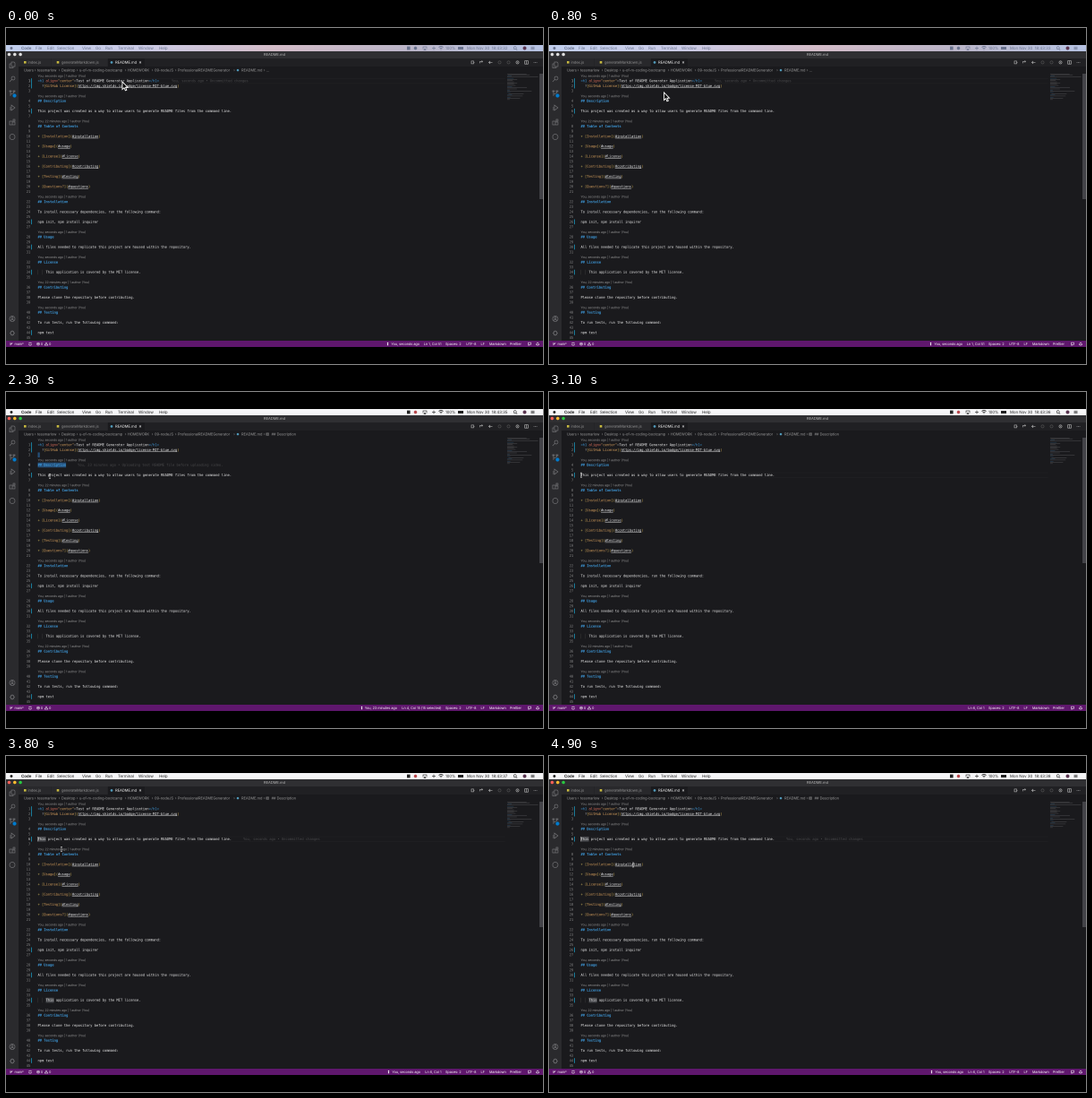
Write an HTML page with a canvas that moves like this. It is 600 px wide and 375 px high and loops after 5 s.

```html
<!DOCTYPE html>
<html lang="en">
<head>
<meta charset="utf-8">
<title>README editor</title>
<style>
  html, body { margin: 0; width: 100%; height: 100%; overflow: hidden; background: #000; }
  canvas { display: block; width: 600px; height: 375px; }
</style>
</head>
<body>
<canvas id="stage" width="600" height="375"></canvas>
<script>
const LOOP = 5000, STEP = 100, SCALE = 4;
const LEFT = 35.5, TOP = 59, CHAR = 2.257, ROW = 5.62;
const SANS = 'Inter, "Liberation Sans", sans-serif';
const MONO = '"DejaVu Sans Mono", monospace';
const WHITE = '#f0f0f0', GREY = '#a0a0a0', DIM = '#4a4a4c', BLUE = '#3f9bdc', ORANGE = '#dba35f', GOLD = '#d8b455';

// The scene is drawn large and scaled down, like a shrunken screen recording.
const stage = document.getElementById('stage').getContext('2d');
const scene = document.createElement('canvas');
scene.width = 600 * SCALE;
scene.height = 375 * SCALE;
const ctx = scene.getContext('2d');
ctx.scale(SCALE, SCALE);
stage.imageSmoothingQuality = 'high';

const LINES = `<h1 align="center">Test of README Generator Application</h1>
  ![GitHub License](https://img.shields.io/badge/license-MIT-blue.svg)

## Description

This project was created as a way to allow users to generate README files from the command line.

## Table of Contents

+ [Installation](#installation)

+ [Usage](#usage)

+ [License](#license)

+ [Contributing](#contributing)

+ [Testing](#testing)

+ [Questions?](#questions)

## Installation

To install necessary dependencies, run the following command:

npm init, npm install inquirer

## Usage

All files needed to replicate this project are housed within the repository.

## License

    This application is covered by the MIT license.

## Contributing

Please clone the repository before contributing.

## Testing

To run tests, run the following command:

npm test
`.split('\n');
const LENSES = { 1: 'seconds', 4: 'seconds', 8: '22 minutes', 22: 'seconds', 28: 'seconds', 32: 'seconds', 36: '22 minutes', 40: 'seconds' };
const EDITED = [1, 2, 6, 26, 30, 34, 44];

// Each code line sits below the author lenses inserted before it.
const lineY = n => TOP + ROW * (n - 1 + Object.keys(LENSES).filter(k => k > 1 && k <= n).length);

function rect(x, y, w, h, color) {
  ctx.fillStyle = color;
  ctx.fillRect(x, y, w, h);
}

function dot(x, y, r, color) {
  ctx.fillStyle = color;
  ctx.beginPath();
  ctx.arc(x, y, r, 0, 7);
  ctx.fill();
}

function stroke(path, x, y, color = '#7c7c7f', width = 0.6) {
  ctx.save();
  ctx.translate(x, y);
  ctx.strokeStyle = color;
  ctx.lineWidth = width;
  ctx.stroke(new Path2D(path));
  ctx.restore();
}

function text(str, x, y, color, { size = 4.06, font = SANS, weight = 400, align = 'left' } = {}) {
  ctx.save();
  ctx.translate(x, y + size * 0.35);
  ctx.scale(1 / SCALE, 1 / SCALE);
  ctx.font = `${weight} ${size * SCALE}px ${font}`;
  ctx.textAlign = align;
  ctx.fillStyle = color;
  ctx.fillText(str, 0, 0);
  ctx.restore();
}

const mono = (str, x, y, color, options) => text(str, x, y, color, { size: 3.748, font: MONO, ...options });

function pieces(line) {
  if (line.startsWith('##')) return [[line, BLUE, 700]];
  if (line.startsWith('<h1')) {
    return [['<h1', BLUE], [' align=', '#e0705c'], ['"center"', ORANGE], ['>', GREY], [line.slice(19, -5), WHITE], ['</h1>', BLUE]];
  }
  const link = line.match(/^(.*)\[(.*)\]\((.*)\)$/);
  if (!link) return [[line, WHITE]];
  return [[link[1], link[1][0] === '+' ? '#c5b15a' : WHITE], ['[', GOLD], [link[2], ORANGE], ['](', GOLD], [link[3], WHITE, 400, true], [')', GOLD]];
}

function menuTint() {
  const tint = ctx.createLinearGradient(0, 0, 600, 0);
  ['#c1cfee', '#cbcbe6', '#d3bcc8', '#bbb5c8', '#b7c4e4'].forEach((color, i) => tint.addColorStop(i / 4, color));
  return tint;
}

function drawMenu(t, focused) {
  const ink = focused ? '#222' : '#69728e';
  rect(0, 19, 600, 7, focused ? '#f5f5f7' : menuTint());
  dot(6, 22.5, 1.5, ink);
  const menu = [['Code', 17], ['File', 33], ['Edit', 46], ['Selection', 57], ['View', 85], ['Go', 100], ['Run', 111], ['Terminal', 125], ['Window', 148], ['Help', 171]];
  menu.forEach(([name, x], i) => text(name, x, 22.5, ink, { size: 4.4, weight: i ? 400 : 700 }));
  rect(448, 20.6, 3.6, 3.8, ink);
  dot(457.5, 22.5, 1.8, focused ? '#b8474c' : ink);
  stroke('M-2 1V-1.5H2V1M-1 2L0 .6L1 2Z', 468, 22.5, ink);
  stroke('M-2 0H2M0-2V2', 478, 22.5, ink);
  stroke('M-2.5-1Q0-3 2.5-1M-1.4 .4Q0-.8 1.4 .4M0 1V2', 486, 22.5, ink, 0.8);
  text('100%', 491, 22.5, ink, { size: 4.2 });
  rect(505, 21, 6, 3, ink);
  const second = 32 + [500, 1100, 1600, 2600, 3600, 4600].filter(at => t >= at).length;
  text('Mon Nov 30  18:43:' + second, 515, 22.5, ink, { size: 4.35 });
  stroke('M1 1L2.2 2.2M1.2-.3A1.5 1.5 0 1 1-1.8-.3A1.5 1.5 0 1 1 1.2-.3', 569, 22.5, ink);
  dot(579.5, 22.5, 2, '#5a3550');
  stroke('M-2-1.3H2M-2 0H2M-2 1.3H2', 588.5, 22.5, ink);
}

function drawHeader(crumb, focused) {
  rect(0, 26, 600, 8, '#2f2f32');
  const lights = focused ? ['#ff5f57', '#febc2e', '#28c840'] : ['#ddd', '#ddd', '#ddd'];
  lights.forEach((color, i) => dot(3.5 + i * 6.3, 29.5, 1.8, color));
  text('README.md', 300, 29.5, '#b5b5b5', { align: 'center' });

  rect(14, 34, 586, 9, '#202023');
  rect(14, 34, 36.5, 9, '#28282b');
  rect(51, 34, 62.5, 9, '#28282b');
  rect(114, 34, 41, 9, '#1a1a1d');
  [20, 56.7].forEach(x => rect(x, 37, 2.6, 2.6, '#c5b83f'));
  text('index.js', 24.5, 38.3, '#999');
  text('generateMarkdown.js', 62, 38.3, '#999');
  dot(118, 38.4, 1.4, '#519aba');
  text('README.md', 122, 38.3, '#fff');
  stroke('M-1-1L1 1M1-1L-1 1', 150, 38.4, '#ccc');

  const circle = 'M1.6 0A1.6 1.6 0 1 1-1.6 0A1.6 1.6 0 1 1 1.6 0';
  const icons = ['M-1.5-1.5H1V1.5H-1.5ZM1 0H2', 'M-2 1V-1H1M0-2L1-1L0 0', 'M2 0H-2L-.5-1.5M-2 0L-.5 1.5', circle, circle, circle + 'M0-.6V.6', 'M-1.8-1.8H1.8V1.8H-1.8ZM0-1.8V1.8'];
  icons.forEach((path, i) => stroke(path, 521.5 + i * 10, 38.4, i === 3 || i === 4 ? '#555' : '#bbb'));
  [-1.5, 0, 1.5].forEach(dx => dot(591.5 + dx, 38.4, 0.4, '#bbb'));

  const heading = crumb.startsWith('#');
  const crumbs = [['Users', 20], ['tessmarlow', 35], ['Desktop', 62], ['u-of-m-coding-bootcamp', 82], ['HOMEWORK', 136], ['09-nodeJS', 166], ['ProfessionalREADMEGenerator', 192], ['README.md', 263], [crumb, heading ? 296.5 : 291]];
  crumbs.forEach(([name, x], i) => {
    const hasIcon = i === 7 || (i === 8 && heading);
    text(name, x, 47.1, GREY, { size: 3.95 });
    if (i) stroke('M-.5-1L.5 0L-.5 1', x - (hasIcon ? 8 : 2.4), 47.1, '#777', 0.4);
  });
  dot(259, 47.1, 1.3, '#519aba');
  if (heading) stroke('M-1.4-1.2H1.4V1.2H-1.4ZM-.5-1.2V1.2M.5-1.2V1.2', 292.2, 47.1, GREY, 0.4);
}

function drawSidebar() {
  rect(0, 34, 14, 315, '#2a2a2d');
  const icons = [
    [41, 'M-1-3H2L3-2V2H-1ZM-1-1H-3V3.5H1V2'],
    [57, 'M-.5 .5L-3 3M3-1A2 2 0 1 1-1-1A2 2 0 1 1 3-1'],
    [73, 'M-2-2V3M2-2Q2 0-2 1M-3-3H-1V-2H-3ZM1-3H3V-2H1Z'],
    [89, 'M-1-3L3 0L-1 3ZM-3 0H-1M-3 2H-1'],
    [105, 'M-3-1H0V3H-3ZM0 0H3V3H0M1-3H3V-1H1Z'],
    [121.5, 'M3 0A3 3 0 1 1-3 0A3 3 0 1 1 3 0'],
    [324.5, 'M3 0A3 3 0 1 1-3 0A3 3 0 1 1 3 0M1-1A1 1 0 1 1-1-1A1 1 0 1 1 1-1M-2 2Q0 0 2 2'],
    [340.5, 'M2 0A2 2 0 1 1-2 0A2 2 0 1 1 2 0M-3 0H-2M2 0H3M0-3V-2M0 2V3M-2-2L-1-1M1 1L2 2M2-2L1-1M-1 1L-2 2']
  ];
  icons.forEach(([y, path]) => stroke(path, 7, y));
  dot(9.5, 75.5, 2.1, '#007acc');
}

function drawEditor(state) {
  rect(14, 43, 586, 306, '#1a1a1d');
  ctx.save();
  ctx.beginPath();
  ctx.rect(14, 43, 586, 306);
  ctx.clip();

  const activeY = lineY(state.line);
  if (state.selected) {
    rect(LEFT, lineY(3) - 2.8, CHAR, 5.6, '#264f78');
    rect(LEFT, activeY - 2.8, 14 * CHAR, 5.6, '#264f78');
  } else {
    rect(LEFT, activeY - 3, 522, 0.5, '#242427');
    rect(LEFT, activeY + 2.6, 522, 0.5, '#242427');
  }
  if (state.word) {
    rect(LEFT, lineY(6) - 2.8, 4 * CHAR, 5.6, '#48494d');
    rect(LEFT + 4 * CHAR, lineY(34) - 2.8, 4 * CHAR, 5.6, '#48494d');
  }
  [0, 2].forEach(col => rect(LEFT + col * CHAR, lineY(34) - 2.8, 0.4, 5.6, '#404040'));

  LINES.forEach((line, i) => {
    const n = i + 1, y = lineY(n);
    if (LENSES[n]) text(`You, ${LENSES[n]} ago | 1 author (You)`, LEFT, y - ROW + 0.1, '#999', { size: 3.38 });
    mono(n, 27.2, y, n === state.line ? '#c6c6c6' : '#858585', { align: 'right' });
    if (EDITED.includes(n)) rect(28, y - 2.8, 1, 5.6, '#1a7d9c');
    let x = LEFT;
    for (const [str, color, weight, underline] of pieces(line)) {
      mono(str, x, y, color, { weight });
      if (underline) rect(x, y + 1.9, str.length * CHAR, 0.45, color);
      x += str.length * CHAR;
    }
    const indent = line.length - line.trimStart().length;
    rect(560 + indent * 0.36, 51.3 + i * 0.66, line.trim().length * 0.36, 0.4, line[0] === '#' ? '#2f506a' : '#59595c');
  });

  if (state.blame) mono(state.blame, state.blameX, activeY, DIM);
  if (state.caret) rect(LEFT + state.caret * CHAR - CHAR, activeY - 2.7, 0.6, 5.4, '#ddd');
  rect(596, 51, 4, 140, '#434348');
  ctx.restore();
}

function drawStatus(state) {
  rect(0, 349, 600, 7, '#5f176d');
  const label = (str, x, align) => text(str, x, 352.6, '#fff', { size: 3.75, align });
  stroke('M-1-1.5V1.5M1-1.5Q1 0-1 .5', 6, 352.6, '#fff');
  label('main*', 9.5);
  stroke('M1.5-.4A1.6 1.6 0 0 0-1.5-.4M-1.5 .4A1.6 1.6 0 0 0 1.5 .4', 27, 352.6, '#fff');
  stroke('M1.5 0A1.5 1.5 0 1 1-1.5 0A1.5 1.5 0 1 1 1.5 0M-.6-.6L.6 .6M.6-.6L-.6 .6', 36, 352.6, '#fff', 0.5);
  label('0', 38.8);
  stroke('M0-1.5L1.7 1.4H-1.7Z', 45, 352.6, '#fff', 0.5);
  label('0', 48);
  if (state.author) {
    label(`You, ${state.author} ago`, state.authorX, 'right');
    const x = state.authorX - (state.selected ? 39.5 : 35.5);
    dot(x, 351.6, 0.7, '#fff');
    rect(x - 0.6, 352.6, 1.2, 1.6, '#fff');
  }
  label(state.position, 486.5, 'right');
  [['Spaces: 2', 491], ['UTF-8', 514], ['LF', 530.5], ['Markdown', 540], ['Prettier', 563]].forEach(([str, x]) => label(str, x));
  stroke('M-1.5-1.5H1.5V.7H0L-1 1.7V.7H-1.5Z', 585, 352.6, '#fff', 0.5);
  stroke('M-1.5 1H1.5L1-.5Q0-2.6-1-.5ZM-.4 1.7H.4', 594, 352.6, '#fff', 0.5);
}

// time, x, y of the pointer hot spot
const PATH = [[0, 130, 60], [500, 129, 68], [800, 128.5, 72], [1000, 38, 70], [1300, 78, 81], [1400, 80, 74], [1700, 79, 80], [2300, 49, 94], [2800, 36, 93], [3300, 36, 92.5], [3700, 60, 103], [4400, 95, 121.5], [5000, 94, 121.5]];

function drawPointer(t) {
  const next = PATH.findIndex(point => point[0] > t);
  const [t0, x0, y0] = PATH[next - 1], [t1, x1, y1] = PATH[next];
  const u = (t - t0) / (t1 - t0), k = u * u * (3 - 2 * u);
  const x = x0 + (x1 - x0) * k, y = y0 + (y1 - y0) * k;
  if (t >= 1000) {
    return stroke('M-1-2.6Q0-2.6 0-1.8V1.8Q0 2.6-1 2.6M1-2.6Q0-2.6 0-1.8M0 1.8Q0 2.6 1 2.6', x, y, '#ddd', 0.6);
  }
  const arrow = new Path2D('M0 0V8.5L2 6.7L3.4 9.8L4.8 9.2L3.5 6.2H6Z');
  ctx.save();
  ctx.translate(x, y);
  ctx.fillStyle = '#000';
  ctx.strokeStyle = '#fff';
  ctx.lineWidth = 0.9;
  ctx.fill(arrow);
  ctx.stroke(arrow);
  ctx.restore();
}

function editorState(t) {
  const changes = 'You, seconds ago • Uncommitted changes';
  if (t < 1200) {
    return { line: 1, crumb: '...', position: 'Ln 1, Col 51', author: 'seconds', authorX: 462, blame: changes, blameX: 185 };
  }
  if (t < 3100) {
    return {
      line: 4, selected: true, crumb: '## Description', position: 'Ln 4, Col 15 (15 selected)', author: '23 minutes', authorX: 437,
      blame: 'You, 23 minutes ago • Uploading test README file before uploading video.', blameX: 80
    };
  }
  const settled = t >= 3600;
  return {
    line: 6, caret: 1, word: settled, crumb: '## Description', position: 'Ln 6, Col 1',
    author: settled && 'seconds', authorX: 463, blame: settled && changes, blameX: 265
  };
}

function draw(t) {
  const state = editorState(t), focused = t >= 1100;
  rect(0, 0, 600, 375, '#000');
  drawEditor(state);
  drawSidebar();
  drawHeader(state.crumb, focused);
  drawMenu(t, focused);
  drawStatus(state);
  drawPointer(t);
  stage.drawImage(scene, 0, 0, 600, 375);
}

const start = performance.now();
let shown = -1;
function tick() {
  const t = Math.floor((performance.now() - start) % LOOP / STEP) * STEP;
  if (t !== shown) draw(shown = t);
  requestAnimationFrame(tick);
}
tick();
</script>
</body>
</html>
```
